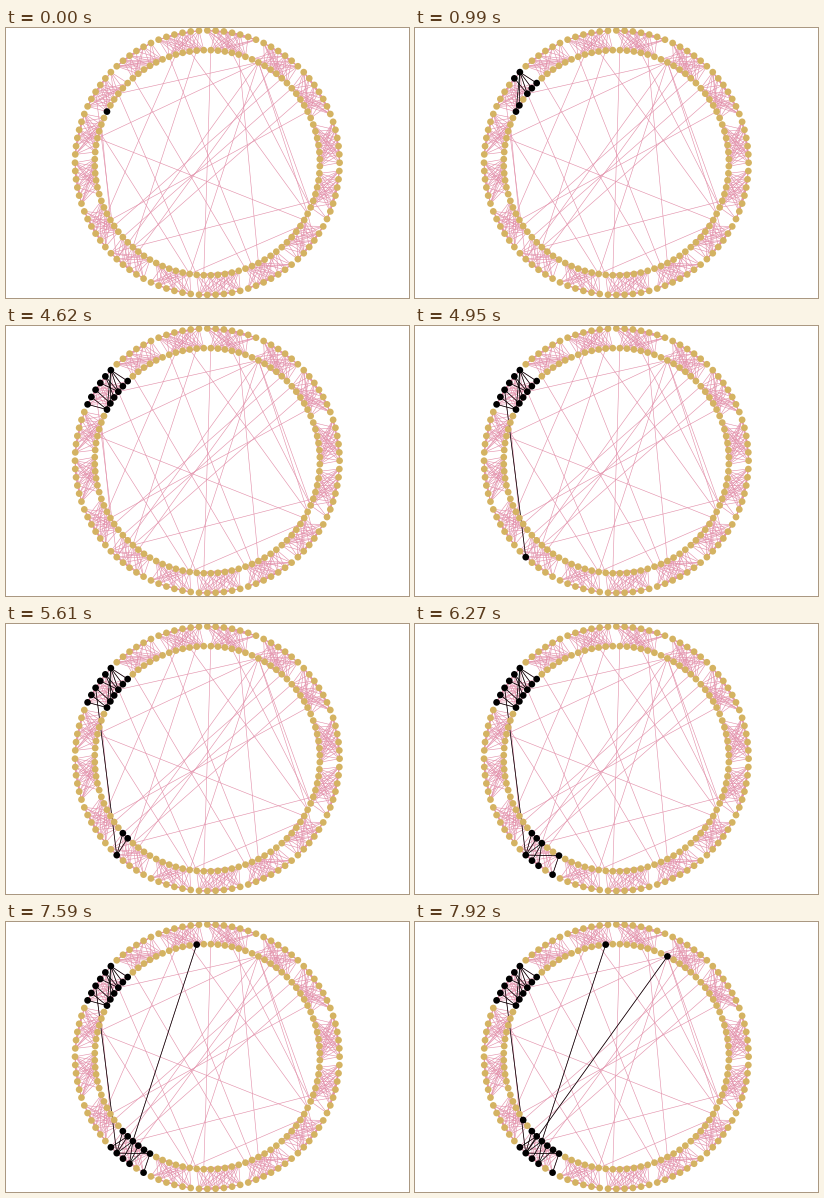
These frames come from a looping animation (403 by 270 pixels, 8000 ms). A matplotlib script:

```python
import random
from itertools import combinations

import numpy as np
import matplotlib.pyplot as plt
from matplotlib.animation import FuncAnimation
from matplotlib.collections import LineCollection

W, H, DPI = 403, 270, 100
STEP, LOOP, TICK = 20, 8000, 330
GOLD, PINK, BLACK = "#d4b362", "#e391ab", "#000000"
PX = 72 / DPI

# Even nodes sit on the outer ring, odd ones on the inner ring.
N = 200
ids = np.arange(N)
angle = 2 * np.pi * ids / N
radius = np.where(ids % 2 == 0, 132.3, 112.6)
pos = np.column_stack([201.3 + radius * np.cos(angle),
                       134.7 - radius * np.sin(angle)])

# Sixteen communities: eight of 12 nodes, then eight of 13.
rng = random.Random(12)
community = {}
edges = []
first = 51
for c in range(16):
    group = [(first + k) % N for k in range(12 + c // 8)]
    community.update((node, c) for node in group)
    edges += [e for e in combinations(group, 2) if rng.random() < 0.72]
    first += len(group)

# Long links: a hub, a diagonal bundle, two steep bundles and single chords.
bridges = [(35, n) for n in (79, 93, 126, 145, 185, 187)]
bridges += [(15 + 4 * k, 117 + 2 * (5 * k % 7)) for k in range(5)]
bridges += [(49 + 12 * k, 149 + 14 * k) for k in range(2)]
bridges += [(43 + 12 * k, 187 - 2 * k) for k in range(2)]
bridges += [(53, 127), (82, 126), (119, 125), (93, 183), (89, 117), (79, 147),
            (145, 181), (127, 189), (91, 145), (41, 165), (59, 115), (73, 161)]

# Nodes reached at each tick.
WAVES = {
    0: [85], 2: [76, 79], 3: [83, 78, 77, 75], 4: [81], 5: [80, 82, 86],
    14: [84], 15: [126], 16: [125], 17: [123], 18: [127, 133, 130],
    19: [128, 134], 20: [124, 131], 21: [129], 23: [53], 24: [35, 119],
}


def find_source(node, reached):
    """Nearest reached mate on the other ring, else the newest bridge end."""
    mates = [m for m in reached
             if community[m] == community[node] and (m - node) % 2]
    if mates:
        return min(mates, key=lambda m: abs(m - node))
    linked = [m for m in reached
              if (m, node) in bridges or (node, m) in bridges]
    return linked[-1] if linked else node


spread = []
for tick, nodes in WAVES.items():
    for node in nodes:
        source = find_source(node, [n for _, n, _ in spread])
        spread.append((tick * TICK, node, source))


def segments(pairs):
    return [pos[[a, b]] for a, b in pairs]


fig = plt.figure(figsize=(W / DPI, H / DPI), dpi=DPI, facecolor="white")
ax = fig.add_axes([0, 0, 1, 1])
ax.set_xlim(0, W)
ax.set_ylim(H, 0)
ax.axis("off")

ax.add_collection(LineCollection(segments(edges + bridges), colors=PINK,
                                 linewidths=0.6 * PX, zorder=1),
                  autolim=False)
trail = LineCollection([], colors=BLACK, linewidths=0.75 * PX, zorder=2)
ax.add_collection(trail, autolim=False)
dots = ax.scatter(pos[:, 0], pos[:, 1], s=(6.7 * PX) ** 2, c=[GOLD] * N,
                  linewidths=0, zorder=3)


def update(i):
    now = i * STEP + STEP / 2
    active = [(node, src) for t, node, src in spread if t <= now]
    colors = [GOLD] * N
    for node, _ in active:
        colors[node] = BLACK
    dots.set_facecolor(colors)
    trail.set_segments(segments(e for e in active if e[0] != e[1]))
    return trail, dots


anim = FuncAnimation(fig, update, frames=LOOP // STEP, interval=STEP,
                     repeat=True, repeat_delay=0, blit=False)
plt.show()
```
